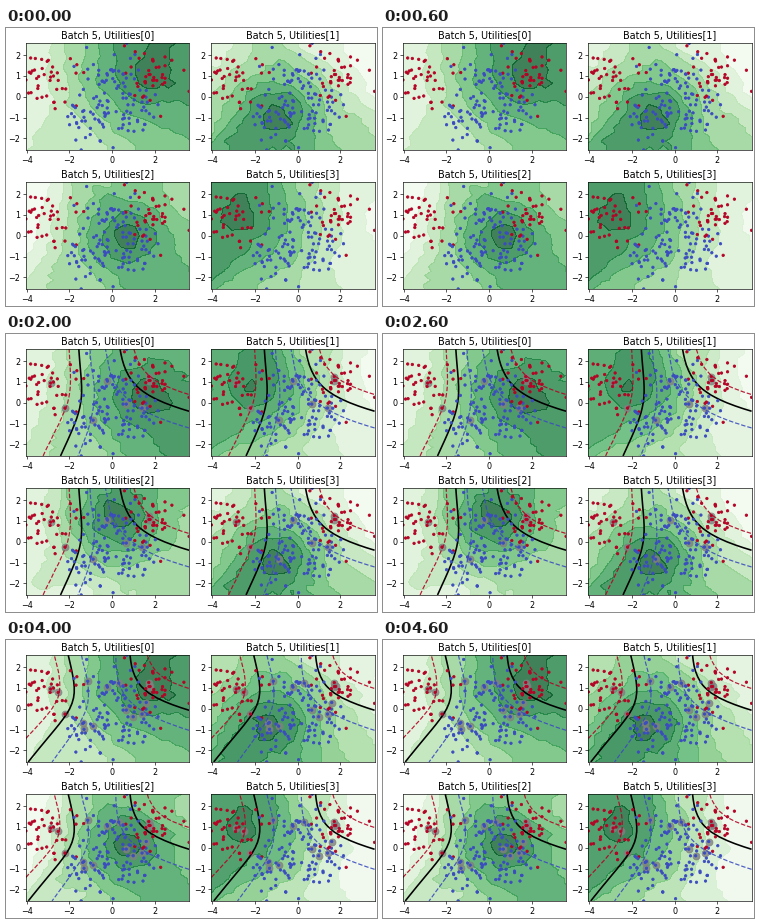
Animation of 371 by 278 pixels, one loop 5 s. Source, as a matplotlib script:

```python
import numpy as np
import matplotlib.pyplot as plt
from matplotlib.animation import ArtistAnimation

W, H, DPI = 371, 278, 58
GAMMA = 0.5          # RBF kernel width of the classifier
NEIGHBOURS = 5

# Starting centres of the four clusters in each query round.
SEEDS = np.array([
    [(2.0, 1.2), (-1.0, -1.0), (0.7, 0.0), (-2.9, 0.95)],
    [(1.87, 1.1), (-2.2, -0.1), (-0.1, 1.0), (1.2, -0.45)],
    [(1.6, 0.4), (-2.3, 0.8), (0.2, 1.2), (-1.0, -1.05)],
    [(1.9, 1.25), (-2.0, -0.65), (0.5, -0.45), (-0.75, 1.25)],
    [(1.87, 1.4), (-1.05, -0.6), (0.7, 0.0), (-2.85, 1.05)],
])


def make_data():
    rng = np.random.RandomState(0)
    hubs = [(0, 1), (-3, 0.5), (-1, -1), (2, 1), (1, -0.5)]
    X = np.concatenate([rng.normal(h, 0.7, (40, 2)) for h in hubs])
    y = np.repeat(np.arange(5) % 2, 40)
    order = np.arange(len(X))
    rng.shuffle(order)
    return X[order], y[order]


X, y = make_data()
LOW, HIGH = X.min(axis=0), X.max(axis=0)


def mesh(res):
    xx, yy = np.meshgrid(np.linspace(LOW[0], HIGH[0], res),
                         np.linspace(LOW[1], HIGH[1], res))
    return xx, yy, np.c_[xx.ravel(), yy.ravel()]


def dist(a, b):
    return np.linalg.norm(a[:, None] - b[None], axis=2)


def prob_red(points, known):
    """Parzen window estimate of the second class."""
    if not known:
        return np.full(len(points), 0.5)
    k = np.exp(-GAMMA * dist(points, X[known]) ** 2)
    return k @ y[known] / k.sum(axis=1)


def entropy(p):
    p = np.clip(p, 1e-12, 1 - 1e-12)
    return -p * np.log(p) - (1 - p) * np.log(1 - p)


def kmeans(points, weights, centers):
    for _ in range(100):
        label = dist(points, centers).argmin(axis=1)
        moved = centers.copy()
        for k in range(len(centers)):
            w = weights * (label == k)
            if w.sum() > 0:
                moved[k] = w @ points / w.sum()
        if np.allclose(moved, centers):
            break
        centers = moved
    return centers


def smooth(points, values, targets):
    """Mean value of the nearest samples."""
    near = np.argsort(dist(targets, points), axis=1)[:, :NEIGHBOURS]
    return values[near].mean(axis=1)


def draw_boundary(ax, known):
    xx, yy, grid = mesh(21)
    red = prob_red(grid, known).reshape(xx.shape)
    lines = [ax.contour(xx, yy, red, [0.5], colors="k", linewidths=2, zorder=1)]
    for p, shade in ((1 - red, 0.0), (red, 1.0)):
        lines.append(ax.contour(xx, yy, p, [0.75], linestyles="--", alpha=0.9,
                                colors=[plt.cm.coolwarm(shade)]))
    return lines


def draw_panel(ax, pool, utility, known):
    xx, yy, grid = mesh(25)
    field = smooth(X[pool], utility, grid).reshape(xx.shape)
    artists = [
        ax.contourf(xx, yy, field, cmap="Greens", alpha=0.75),
        ax.scatter(*X.T, c=y, cmap="coolwarm", marker=".", zorder=2),
    ]
    if known:
        artists.append(ax.scatter(*X[known].T, c="grey", alpha=0.8,
                                  marker=".", s=300))
        artists += draw_boundary(ax, known)
    return artists


fig, axes = plt.subplots(2, 2, figsize=(W / DPI, H / DPI), dpi=DPI,
                         layout="constrained")
for i, ax in enumerate(axes.flat):
    ax.set_title(f"Batch 5, Utilities[{i}]")

scenes, known = [], []
for seeds in SEEDS:
    pool = np.setdiff1d(np.arange(len(X)), known)
    weights = entropy(prob_red(X[pool], known))
    centers = kmeans(X[pool], weights, seeds)
    scene, picked = [], []
    for ax, center in zip(axes.flat, centers):
        utility = -np.linalg.norm(X[pool] - center, axis=1)
        scene += draw_panel(ax, pool, utility, known)
        best = pool[utility.argmax()]
        picked.append(best)
        pool = pool[pool != best]
    known = known + picked
    scenes.append(scene)

for ax in axes.flat:
    ax.set(xlim=(LOW[0], HIGH[0]), ylim=(LOW[1], HIGH[1]))

anim = ArtistAnimation(fig, scenes, interval=1000, repeat=True, repeat_delay=0)
plt.show()
```
